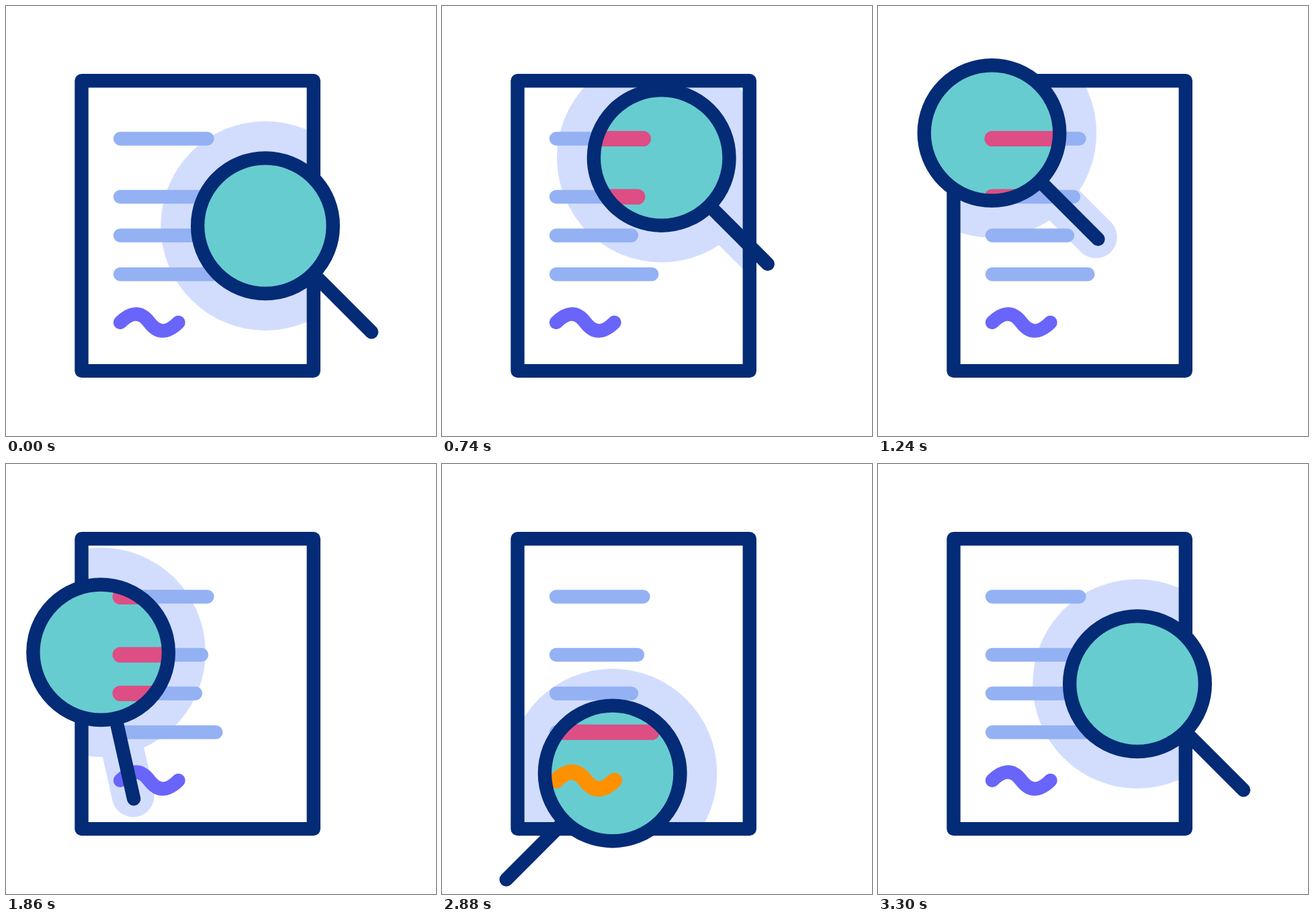
An HTML page that plays this animation: 640 px wide and 640 px high, repeating every 3.62 s.

```html
<!DOCTYPE html>
<html lang="en">
<head>
<meta charset="utf-8">
<title>Document check</title>
<style>
  html, body { margin: 0; width: 100%; height: 100%; overflow: hidden; background: #fff; }
  svg { display: block; width: 100%; height: 100%; }
  .stroke { fill: none; stroke-width: 20.4; stroke-linecap: round; stroke-linejoin: round; }
  .navy { stroke: #042b76; }
  .text { stroke: #94b1f4; }
  .sign { stroke: #6965fa; }
  .zoom .text { stroke: #dd4e85; stroke-width: 23; }
  .zoom .sign { stroke: #ff9100; stroke-width: 23; }
</style>
</head>
<body>
<svg viewBox="0 0 640 640">
  <defs>
    <clipPath id="page"><rect x="112.5" y="111.3" width="345.3" height="431.8"/></clipPath>
    <clipPath id="glass"><circle id="spot" r="95"/></clipPath>
    <path id="lines" d="M170 197.5H299.5M170 284H291M170 341.5H282M170 399.3H312.4"/>
    <path id="wave" d="M170 471C184 457 199 452 213.3 471C227.6 490 242.6 485 256.6 471"/>
  </defs>

  <g clip-path="url(#page)">
    <g class="mover" fill="#d2ddfe">
      <circle r="155.7"/>
      <path d="M0 0H219" stroke="#d2ddfe" stroke-width="63" stroke-linecap="round"/>
    </g>
  </g>
  <use href="#lines" class="stroke text"/>
  <use href="#wave" class="stroke sign"/>
  <rect class="stroke navy" x="112.5" y="111.3" width="345.3" height="431.8"/>

  <g class="mover">
    <path class="stroke navy" d="M101 0H223.5"/>
    <circle r="96" fill="#67ccd0"/>
  </g>
  <g class="zoom" clip-path="url(#glass)">
    <use href="#lines" class="stroke text"/>
    <use href="#wave" class="stroke sign"/>
  </g>
  <circle id="ring" class="stroke navy" r="100.8"/>
</svg>

<script>
const LOOP = 3620, STEP = 20;

// Each leg: start, end, ease shape, cubic path of the lens centre
const legs = [
  { from: 200, to: 1230, bend: 3, path: [[386, 327.2], [376, 323], [330, 131], [169.5, 189]] },
  { from: 1500, to: 2402, bend: 3, path: [[169.5, 189], [113, 267], [148.1, 376], [212.3, 463.5]] },
  { from: 2710, to: 3300, bend: 2.2, path: [[212.3, 463.5], [300, 465], [408, 412], [386, 327.2]] }
];
const turns = [
  { from: 1500, to: 2402, bend: 3, a: 45, b: 137.2 },
  { from: 2820, to: 3300, bend: 1.6, a: 137.2, b: 45 }
];

const movers = document.querySelectorAll('.mover');
const dots = [document.getElementById('spot'), document.getElementById('ring')];

// bend 3 is a full ease in and out; lower values keep speed at the end
function progress({ from, to, bend }, t) {
  const p = Math.min(1, Math.max(0, (t - from) / (to - from)));
  return p * p * (bend + (1 - bend) * p);
}

function along(path, s) {
  const r = 1 - s;
  const w = [r * r * r, 3 * s * r * r, 3 * s * s * r, s * s * s];
  return [0, 1].map(k => path.reduce((sum, p, i) => sum + w[i] * p[k], 0));
}

const active = (list, t) => list.filter(item => t >= item.from).pop() || list[0];

function draw(t) {
  const leg = active(legs, t), turn = active(turns, t);
  const [x, y] = along(leg.path, progress(leg, t));
  const angle = turn.a + (turn.b - turn.a) * progress(turn, t);
  movers.forEach(m => m.setAttribute('transform', `translate(${x} ${y}) rotate(${angle})`));
  dots.forEach(d => {
    d.setAttribute('cx', x);
    d.setAttribute('cy', y);
  });
}

let start = null;
function tick(now) {
  if (start === null) start = now;
  const t = (now - start) % LOOP;
  draw(Math.floor(t / STEP) * STEP);
  requestAnimationFrame(tick);
}
draw(0);
requestAnimationFrame(tick);
</script>
</body>
</html>
```
